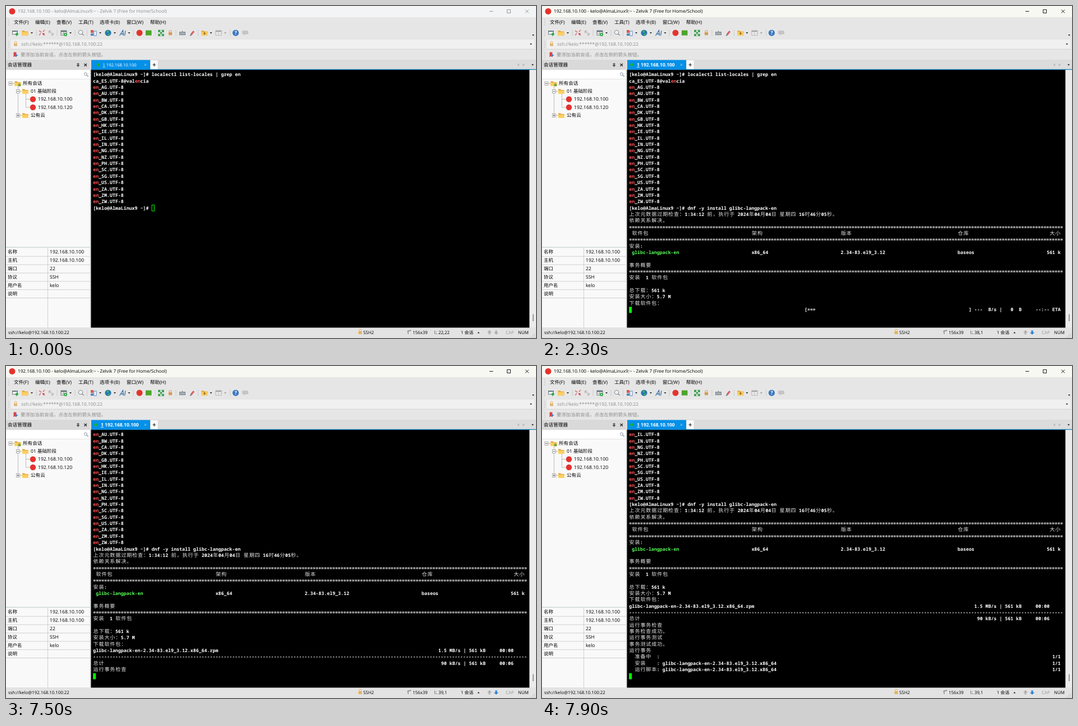
An HTML page for the animation above (8000 ms loop, 945 by 593 pixels).

```html
<!DOCTYPE html>
<html lang="zh-CN">
<head>
<meta charset="utf-8">
<title>Terminal session</title>
<style>
  html, body { margin: 0; width: 100%; height: 100%; overflow: hidden; background: #e6e6e6; }
  svg { display: block; width: 945px; height: 593px; }
  text { white-space: pre; text-rendering: geometricPrecision; font-family: "Open Sans", "Noto Sans CJK SC", "Noto Sans CJK", sans-serif; }
  .mono { font: bold 8.275px "Noto Sans Mono", "DejaVu Sans Mono", monospace; }
  .han { font: 9.1px "Noto Sans CJK SC", "Noto Sans CJK", sans-serif; letter-spacing: .83px; }
</style>
</head>
<body>
<svg id="stage" viewBox="0 0 945 593">
  <g id="chrome"></g>
  <g id="live"></g>
  <g id="term"></g>
</svg>
<script>
const USER = 'kelo', IP = '192.168.10.100';
const LOOP = 8000;

// Drawing helpers; text is centred vertically on y
const rect = (x, y, w, h, fill, more = '') =>
  `<rect x="${x}" y="${y}" width="${w}" height="${h}" fill="${fill}" ${more}/>`;
const path = (d, stroke, w = 1, fill = 'none', more = '') =>
  `<path d="${d}" stroke="${stroke}" stroke-width="${w}" fill="${fill}" ${more}/>`;
const shape = (d, fill) => path(d, 'none', 0, fill);
const disc = (x, y, r, fill) => `<circle cx="${x}" cy="${y}" r="${r}" fill="${fill}"/>`;
const label = (x, y, s, size = 8.5, fill = '#000', more = '') =>
  `<text x="${x}" y="${(y + size * .34).toFixed(2)}" font-size="${size}" fill="${fill}" ${more}>${s}</text>`;
const caret = (x, y, fill = '#222') => shape(`M${x - 2} ${y - 1}h4l-2 2.4z`, fill);
const folder = (x, y, w = 11) =>
  shape(`M${x} ${y - 4}h4l1.5 1.5h${w - 5.5}v7h-${w}z`, '#e9a93a') +
  rect(x, y - 1.4, w, 5.9, '#fbcf62');
const padlock = (x, y, fill) =>
  rect(x - 3, y - 1, 6, 5, fill) + path(`M${x - 2} ${y - 1}v-1.5a2 2 0 0 1 4 0v1.5`, fill);
const lens = (x, y, r, c) =>
  `<circle cx="${x}" cy="${y}" r="${r}" fill="#eef4f8" stroke="${c}"/>` + path(`M${x + r * .7} ${y + r * .7}l3 3`, c, 1.5);
const grid = (x, y, c) =>
  rect(x - 5, y - 4, 10, 8, '#fff', `stroke="${c}"`) + rect(x - 5, y - 4, 10, 2.5, c) + path(`M${x - 5} ${y + 1}h10M${x} ${y - 3}v7`, c, .7);
const expander = (x, y, plus) =>
  rect(x - 3, y - 3, 6, 6, '#fff', 'stroke="#999" stroke-width=".8"') +
  path(`M${x - 2} ${y}h4${plus ? `M${x} ${y - 2}v4` : ''}`, '#444', .8);
const arrow = (x, y, dir, fill) =>
  shape(`M${x} ${y - 4 * dir}l4 ${4 * dir}h-2.5v${3.5 * dir}h-3v${-3.5 * dir}h-2.5z`, fill);

function toolbar() {
  const y = 48;
  let s = '';
  for (const x of [54, 91, 123, 144.5, 227, 266, 303, 342.5, 400]) s += path(`M${x} 42.5v11`, '#c4c4c4', .8);
  for (const x of [46, 115, 168, 194, 219.5, 365.5]) s += caret(x, y);
  s += caret(391, y, '#999');
  s += rect(11.5, 44.5, 9, 6, '#fff', 'stroke="#66757d"') + rect(11, 44, 10, 2, '#66757d') + path('M19 47.5v6M16 50.5h6', '#24a044', 1.8);
  s += folder(28.5, y);
  s += path('M59 44l4 3M65 49l4 3.5M59 52l3-3M66 46l3-3', '#d85959', 1.3) + disc(62, 46, 1.6, '#d99') + disc(67, 50, 1.8, '#c55');
  s += path('M77 45l6 6M77 48a2 2 0 1 1 3-3M83 48a2 2 0 1 1-2 4', '#b5b5b5', 1.3);
  s += grid(103, y, '#66757d') + disc(106, 51, 3, '#36aa48') + disc(106, 51, 1, '#fff');
  s += lens(133, 47, 3.7, '#848b90');
  s += rect(151, 43, 5, 5, '#d45a4e') + rect(151, 49, 5, 4, '#5785b9') + rect(157, 45, 4, 8, '#fff', 'stroke="#5785b9"');
  s += disc(182, y, 5.6, '#2876b7') + shape('M179 45l3-2 2 3-3 2zM182 49l3 0-1 4-2-1z', '#43ad5a');
  s += path('M202.5 53l6-9.5 1 9.5M205 50h4M213 44l-1.5 9', '#3b6ea5', 1.3);
  s += disc(238, y, 5.5, '#e5322d') + rect(249, 43.5, 10.5, 9, '#4da52c');
  s += path('M272 47v-3.5h3.5M277.5 43.5h3.5v3.5M281 49.5v3.5h-3.5M275.5 53h-3.5v-3.5M272.5 44l8 8.5M280.5 44l-8 8.5', '#25963d', 1.4);
  s += padlock(293, y, '#d89a4c');
  s += rect(309, 46, 11, 6, '#7a858c') + path('M310 48h9M310 50h9', '#e4e7e9', .8) + path('M314.5 46v-2', '#7a858c');
  s += path('M330 51l5-6', '#d66564', 3.5) + path('M328.5 53l2-2', '#777', 2);
  s += folder(348.5, y) + path('M354 46.5v5M351.5 49h5', '#8b5e1d', 1.2);
  s += grid(379, y, '#aaa');
  s += disc(409.5, y, 5.6, '#3a77bd') + label(407.4, y, '?', 9, '#fff', 'font-weight="bold"');
  s += rect(421, 44, 11, 6.5, '#c4c4c4', 'rx="1.5"') + shape('M424 50v3l3-3z', '#c4c4c4');
  return s + caret(940, 52);
}

function sidebar() {
  let s = rect(0, 97, 150, 17, '#d9d9d9') + label(3, 105, '会话管理器', 8.6);
  s += path('M126.5 103h4M127.5 103v3.5M129.5 103v3.5M126 106.5h5M128.5 106.5v2.5', '#222', .9);
  s += path('M139.5 103l4.5 4.5M144 103l-4.5 4.5', '#222', 1.2);
  s += rect(0, 114, 150, 460, '#f9f9f9') + rect(0, 115, 150, 15, '#fff') + path('M0 130.5h150', '#dedede', .8) + lens(142, 121.5, 2.6, '#9aa3ad');
  s += path('M11 138.5h4M21.5 142v53.5M21.5 152.5h7M21.5 195.5h7M35.5 157v24M35.5 166.5h7M35.5 181h7', '#aaa', .8);
  s += expander(8, 138.5) + folder(15.5, 138.5) + disc(24, 141, 2.6, '#7ba743') + label(30, 138, '所有会话', 8.6);
  s += expander(21.5, 152.5) + folder(29, 152.5) + label(44, 152.5, '01 基础阶段');
  [[166.5, IP], [181, '192.168.10.120']].forEach(([y, t]) => s += disc(48, y, 5.2, '#e5322d') + label(57, y, t, 8.65));
  s += expander(21.5, 195.5, true) + folder(29, 195.5) + label(44, 195, '公有云', 8.6);
  s += rect(0, 430, 150, 2, '#d8e2e0');
  [['名称', IP], ['主机', IP], ['端口', '22'], ['协议', 'SSH'], ['用户名', USER], ['说明', '']].forEach(([key, value], i) => {
    const y = 439.5 + i * 14.87;
    s += label(3, y, key) + label(78, y, value, 8.65) + path(`M0 ${y + 7.7}h150`, '#c6c6c6', .8);
  });
  return s + path('M74.5 432v142', '#c6c6c6', .8) + rect(149.5, 97, 2.5, 477, '#e1e1e1');
}

function statusBar() {
  const y = 583;
  let s = rect(0, 574, 945, 19, '#e3e3e3');
  s += padlock(631.5, 582, '#e5b15c') + label(637, y, 'SSH2', 7.9);
  s += path('M717 586v-6h5M717 580l-1.5 1.5M722 580l-1.5-1.5', '#555', .9) + label(725, y, '156x39', 7.9);
  s += path('M764.5 580v6M766 582h1.5M766 585.5h3', '#777') + label(811, y, '1 会话', 7.9);
  s += shape('M840.5 584.5h4l-2-2.6z', '#222') + label(891, y, 'CAP', 7.9, '#999') + label(913, y, 'NUM', 7.9);
  for (let i = 0; i < 3; i++)
    for (let j = 0; j <= i; j++) s += rect(942 - 3 * j, 585 + 3 * i, 1.2, 1.2, '#aaa');
  return s;
}

function chrome() {
  let s = rect(0, 0, 945, 593, '#e6e6e6');
  [[14, '文件(F)'], [52, '编辑(E)'], [90, '查看(V)'], [129, '工具(T)'], [167, '选项卡(B)'], [215, '窗口(W)'], [257, '帮助(H)']]
    .forEach(([x, t]) => s += label(x, 29.5, t));
  for (const y of [29, 48, 68, 87]) s += path(`M5 ${y - 5}v11`, '#aaa', 1, 'none', 'stroke-dasharray="1 1.5"');
  s += toolbar();
  s += rect(9, 60, 933, 16, '#f0f0f0') + padlock(17, 67.5, '#e3b878') + label(27, 68, `ssh://${USER}:******@${IP}:22`, 8.3, '#8a8a8a') + caret(936, 68);
  s += path('M0 77.5h945M0 96.5h945', '#d6d6d6', .8);
  s += shape('M13.5 82.5h5v9l-2.5-2-2.5 2z', '#d9434a') + shape('M17 85l4.5 3-4.5 3z', '#4f7fb8');
  s += label(26, 87.5, '要添加当前会话，点击左侧的箭头按钮。', 8.45, '#8a8a8a');
  s += rect(152, 97, 793, 16, '#dcdcdc') + rect(152, 96.4, 105, 17, '#0590e8') + rect(258, 97, 12.5, 16, '#fafafa');
  s += path('M261.5 105h5.5M264.25 102.25v5.5', '#222', 1.2) + path('M246.5 103l4 4M250.5 103l-4 4', '#8fd0fa', .9);
  s += shape('M915 102.5l-3.5 2.5 3.5 2.5zM921.5 102.5l3.5 2.5-3.5 2.5z', '#b8b8b8') + caret(939, 105);
  s += sidebar() + statusBar();
  s += rect(151.5, 114, 782, 460.5, '#000') + rect(151.5, 112.8, 793.5, 1.4, '#1583bd');
  return s + rect(933.5, 114.2, 11.5, 460, '#ececec') + rect(939.4, 550.5, 1.2, 12.5, '#666');
}

// Terminal content: each line is a list of [column, text, colour]
const CW = 4.965, RH = 11.35, LEFT = 155.2, TOP = 117.4;
const RED = '#ff5555', GREEN = '#55ff55', LIME = '#00ff00';
const PKG = 'glibc-langpack-en', FULL = PKG + '-2.34-83.el9_3.12.x86_64';
const CMD = `dnf -y install ${PKG}`, PROMPT = [0, `[${USER}@AlmaLinux9 ~]# `];
const RULE = [[0, '='.repeat(156)]], DONE = [152, '1/1'];
const setup = [[2, '安装'], [10, ': ' + FULL]];
const script = [[2, '运行脚本: ' + FULL], DONE];
const ready = [[2, '准备中  :'], DONE];
const waiting = [[63, '['], [122, '] ---  B/s |'], [137, '0  B'], [146, '--:-- ETA']];
const bar = i => [...waiting, [64 + 3 * i, '===']];

const lines = [
  [PROMPT, [21, 'localectl list-locales | grep en']],
  [[0, 'ca_ES.UTF-8@val'], [15, 'en', RED], [17, 'cia']],
  ...'AG AU BW CA DK GB HK IE IL IN NG NZ PH SC SG US ZA ZM ZW'.split(' ')
    .map(c => [[0, 'en', RED], [2, `_${c}.UTF-8`]]),
  [PROMPT, [21, CMD]],
  [[0, '上次元数据过期检查：1:34:12 前，执行于 2024年04月04日 星期四 16时46分05秒。']],
  [[0, '依赖关系解决。']],
  RULE,
  [[1, '软件包'], [44, '架构'], [76, '版本'], [118, '仓库'], [151, '大小']],
  RULE,
  [[0, '安装:']],
  [[1, PKG, GREEN], [44, 'x86_64'], [76, '2.34-83.el9_3.12'], [118, 'baseos'], [150, '561 k']],
  [],
  [[0, '事务概要']],
  RULE,
  [[0, '安装  1 软件包']],
  [],
  [[0, '总下载：561 k']],
  [[0, '安装大小：5.7 M']],
  [[0, '下载软件包：']],
  [[0, FULL + '.rpm'], [124, '1.5 MB/s | 561 kB'], [146, '00:00']],
  [[0, '-'.repeat(156)]],
  [[0, '总计'], [125, '90 kB/s | 561 kB'], [146, '00:06']],
  ...['运行事务检查', '事务检查成功。', '运行事务测试', '事务测试成功。', '运行事务'].map(t => [[0, t]]),
  ready,
  [...setup, DONE],
  script
];

// n = finished lines, tail = unfinished line below them, col = cursor column
const steps = [
  [0, { n: 21, tail: [PROMPT], col: 21 }],
  [200, { focus: true }],
  [300, { solid: true, down: true }],
  [900, { tail: [PROMPT, [21, CMD, '#000']], col: 53, pasted: true, selected: true, up: true }],
  [1100, { up: false }],
  [1500, { n: 22, tail: [], col: 0, selected: false, up: true }],
  [1700, { n: 23, up: false }],
  [1800, { n: 37 }],
  [1900, { tail: bar(0) }],
  [2300, { pasted: false }],
  ...[2800, 3200, 4200, 5100, 6000, 6900].map((t, i) => [t, { tail: bar(i + 1) }]),
  [7300, { tail: [[0, 'g', '#000'], [1, FULL.slice(1) + '.rpm'], [60, '0%'], ...waiting] }],
  [7500, { n: 41, tail: [] }],
  [7600, { n: 45, tail: ready, col: 155 }],
  [7700, { n: 46, tail: [...setup, [54, '[' + '='.repeat(41)], [150, ']'], DONE] }],
  [7800, { n: 47, tail: script }],
  [7900, { n: 48, tail: [], col: 0 }]
];
const states = [];
steps.forEach(([, change], i) => states.push({ ...states[i - 1], ...change }));

const scrolled = st => Math.max(0, st.n - 38);

function drawLine(pieces, row) {
  const y = (TOP + row * RH + 7.8).toFixed(2);
  let s = '';
  for (const [start, text, fill] of pieces) {
    let col = start;
    for (const run of text.match(/[\u2e80-\uffff]+|[^\u2e80-\uffff]+/g)) {
      const han = run.charCodeAt(0) >= 0x2e80;
      const x = (LEFT + col * CW + (han ? .4 : 0)).toFixed(2);
      s += `<text class="${han ? 'han' : 'mono'}" x="${x}" y="${y}" fill="${fill || (han ? '#e2e2e2' : '#fff')}">${run}</text>`;
      col += run.length * (han ? 2 : 1);
    }
  }
  return s;
}

function drawTerm(st) {
  const off = scrolled(st), row = st.n - off;
  const x = LEFT + st.col * CW, y = TOP + row * RH;
  let s = st.selected ? rect(LEFT + 21 * CW, y, 32 * CW, RH - .3, '#f0f0f0') : '';
  s += st.solid ? rect(x, y, CW, RH - .5, LIME)
    : rect(x + .6, y - .2, CW - .6, RH - .9, 'none', `stroke="${LIME}"`);
  for (let i = off; i < st.n; i++) s += drawLine(lines[i], i - off);
  return s + drawLine(st.tail, row);
}

function drawLive(st) {
  const ink = st.focus ? '#000' : '#8c8c8c';
  const tab = `<tspan text-decoration="underline">1</tspan> ${IP}`;
  return rect(0, 0, 945, 20, st.focus ? '#f8f8f3' : '#f3f4f5') + disc(11, 9.5, 5.5, '#e5322d') +
    label(21, 9.5, `${IP} - ${USER}@AlmaLinux9:~ - Zelvik 7 (Free for Home/School)`, 8.2, ink) +
    path('M862 9.5h6.5M893.5 6.5h6v6h-6zM926 6.5l6 6M932 6.5l-6 6', ink, .9) +
    disc(st.focus ? 160 : 164.5, 105, 2.7, '#16b52c') +
    (st.focus ? label(169, 105, tab, 8.5, '#fff', 'font-weight="bold"') : label(172.5, 105, tab, 7.6, '#fff')) +
    label(4, 583, st.pasted ? '粘贴32字符。' : `ssh://${USER}@${IP}:22`, 7.83) +
    label(771, 583, `${st.n - scrolled(st) + 1},${st.col + 1}`, 7.9) +
    arrow(862, 583, 1, st.up ? '#0fa01c' : '#adadad') +
    arrow(874, 583, -1, st.down ? '#2d7fd6' : '#adadad');
}

const $ = id => document.getElementById(id);
$('chrome').innerHTML = chrome();
let shown = -1;
const begin = performance.now();

function frame() {
  const t = (performance.now() - begin) % LOOP;
  let i = steps.length - 1;
  while (steps[i][0] > t) i--;
  if (i !== shown) {
    shown = i;
    $('live').innerHTML = drawLive(states[i]);
    $('term').innerHTML = drawTerm(states[i]);
  }
  requestAnimationFrame(frame);
}
frame();
</script>
</body>
</html>
```
